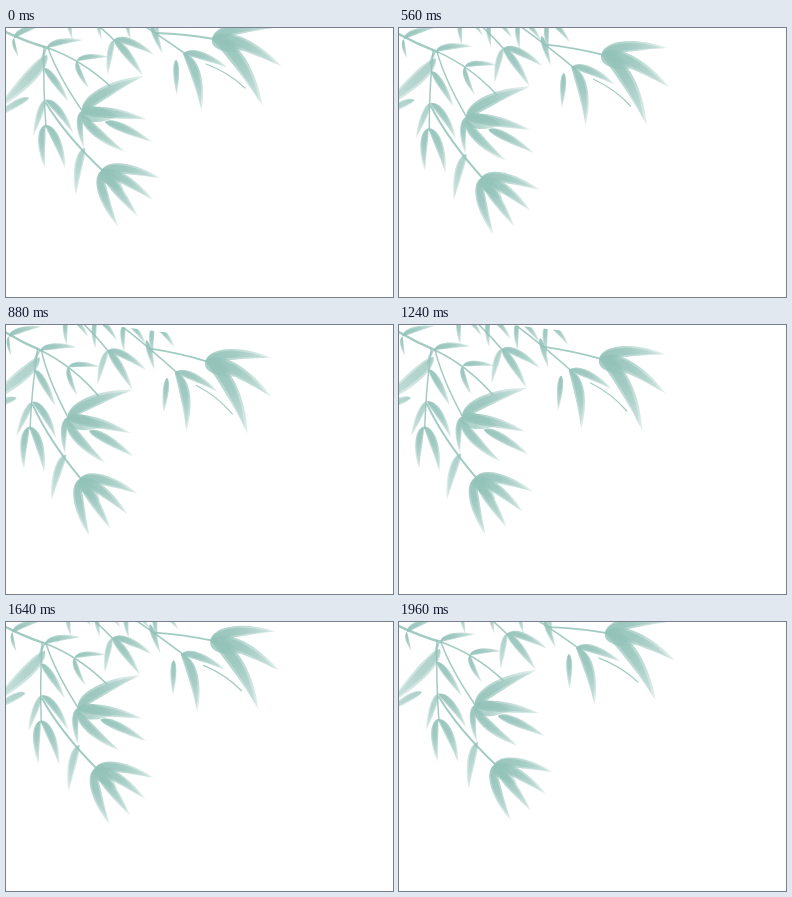
These frames come from a looping animation (387x269 px, 2000 ms). An HTML page with a canvas:

```html
<!DOCTYPE html>
<html>
<head>
<meta charset="utf-8">
<style>
html, body { margin: 0; width: 100%; height: 100%; overflow: hidden; background: #fff; }
canvas { display: block; filter: blur(0.4px); }
</style>
</head>
<body>
<canvas id="stage" width="387" height="269"></canvas>
<script>
const ctx = document.getElementById('stage').getContext('2d');
const LOOP = 2000, STEP = 40, SWAY = 0.124, PIVOT = [-9, -32], TOP = -13;
const tint = a => `rgba(146,194,184,${a})`;
const mix = (a, b, k) => a + (b - a) * k;

// A brush stroke lying along +x: half-width w, sideways bend b, fading to the tip.
function blade(len, w, b, base, tip) {
  const g = ctx.createLinearGradient(0, 0, len, 0);
  g.addColorStop(0, tint(base));
  g.addColorStop(0.4, tint(mix(base, tip, 0.2)));
  g.addColorStop(1, tint(tip));
  ctx.fillStyle = g;
  ctx.beginPath();
  ctx.moveTo(0, 0);
  ctx.bezierCurveTo(len * 0.08, b + w, len * 0.6, b + w * 0.7, len, 0);
  ctx.bezierCurveTo(len * 0.6, b - w * 0.7, len * 0.08, b - w, 0, 0);
  ctx.fill();
}

function leaf(x, y, degrees, len, bend) {
  const w = len * 0.13, b = len * bend;
  const ink = degrees > 95 ? 0.5 : 0.75; // leaves pointing back are paler
  ctx.save();
  ctx.translate(x, y);
  ctx.rotate(degrees * Math.PI / 180);
  blade(len, w, b, ink, 0.25);
  blade(len * 0.94, w * 0.65, b, ink, 0.2);
  ctx.restore();
}

// Leaves spread evenly between two angles; the bend eases from upward to curl.
function fan(x, y, n, from, to, len0, len1 = len0, curl = 0.1) {
  for (let i = 0; i < n; i++) {
    const k = i / (n - 1);
    leaf(x, y, mix(from, to, k), mix(len0, len1, k), mix(-0.11, curl, k * k));
  }
  if (n < 3) return;
  ctx.save(); // dense heart of a full tuft
  ctx.translate(x, y);
  ctx.rotate((from + to) / 2 * Math.PI / 180);
  blade(len0 * 0.5, len0 * 0.17, 0, 0.8, 0.3);
  ctx.restore();
}

function stem(width, x, y, ...curve) {
  ctx.lineWidth = width;
  ctx.beginPath();
  ctx.moveTo(x, y);
  ctx.quadraticCurveTo(...curve);
  ctx.stroke();
}

function leftBranch() {
  stem(2.4, -12, -2, 14, 12, 42, 20);
  stem(1.5, 42, 20, 52, 48, 77, 84);
  stem(1.5, 38, 19, 37, 60, 40, 99);
  stem(2, 40, 75, 60, 108, 97, 143);
  stem(1.6, 42, 20, 76, 32, 104, 58);

  fan(8, 10, 2, -24, 76, 35, 20);
  fan(41, 20, 2, -12, 108, 37, 18);
  fan(71, 33, 2, -7, 66, 32, 30);
  leaf(41, 27, 133, 76, -0.04);
  leaf(23, 70, 150, 43, 0.05);

  leaf(38, 40, 54, 42, -0.04);
  fan(39, 72, 2, 50, 108, 44, 38, 0.03);
  fan(39, 97, 2, 65, 90, 48, 43);
  leaf(79, 120, 101, 48, 0.08);

  leaf(76, 83, 87, 37, 0.1);
  fan(76, 85, 3, -31, 42, 72, 58);
  leaf(99, 94, 23, 51, -0.04);
  fan(95, 143, 4, 7, 73, 60, 58);
}

function rightBranch() {
  stem(1.6, 79, -13, 96, 0, 109, 13);
  stem(1.6, 117, -15, 146, 2, 181, 27);
  stem(1.8, 150, 5, 180, 6, 208, 11);
  stem(1.2, 200, 36, 222, 44, 239, 60);

  for (let x = 64; x < 160; x += 29) fan(x, -18, 2, 40, 85, 30);
  fan(108, 12, 2, 20, 51, 43, 46, -0.04);
  leaf(108, 12, 100, 36, 0.06);
  leaf(145, -3, 68, 31, 0);
  leaf(170, 32, 89, 35, 0);
  fan(177, 26, 2, 17, 72, 47, 60, -0.13);
  fan(206, 11, 3, -10, 53, 66, 84, -0.13);
}

function frame(now) {
  const t = Math.floor(now % LOOP / STEP) * STEP;
  const angle = SWAY * (1 - Math.cos(2 * Math.PI * t / LOOP)) / 2;
  ctx.clearRect(0, 0, 387, 269);
  ctx.save();
  ctx.translate(...PIVOT);
  ctx.rotate(angle);
  ctx.translate(-PIVOT[0], -PIVOT[1]);
  ctx.beginPath();
  ctx.rect(-60, TOP, 500, 400);
  ctx.clip();
  ctx.strokeStyle = tint(0.85);
  ctx.lineCap = 'round';
  leftBranch();
  rightBranch();
  ctx.restore();
  requestAnimationFrame(frame);
}
requestAnimationFrame(frame);
</script>
</body>
</html>
```
